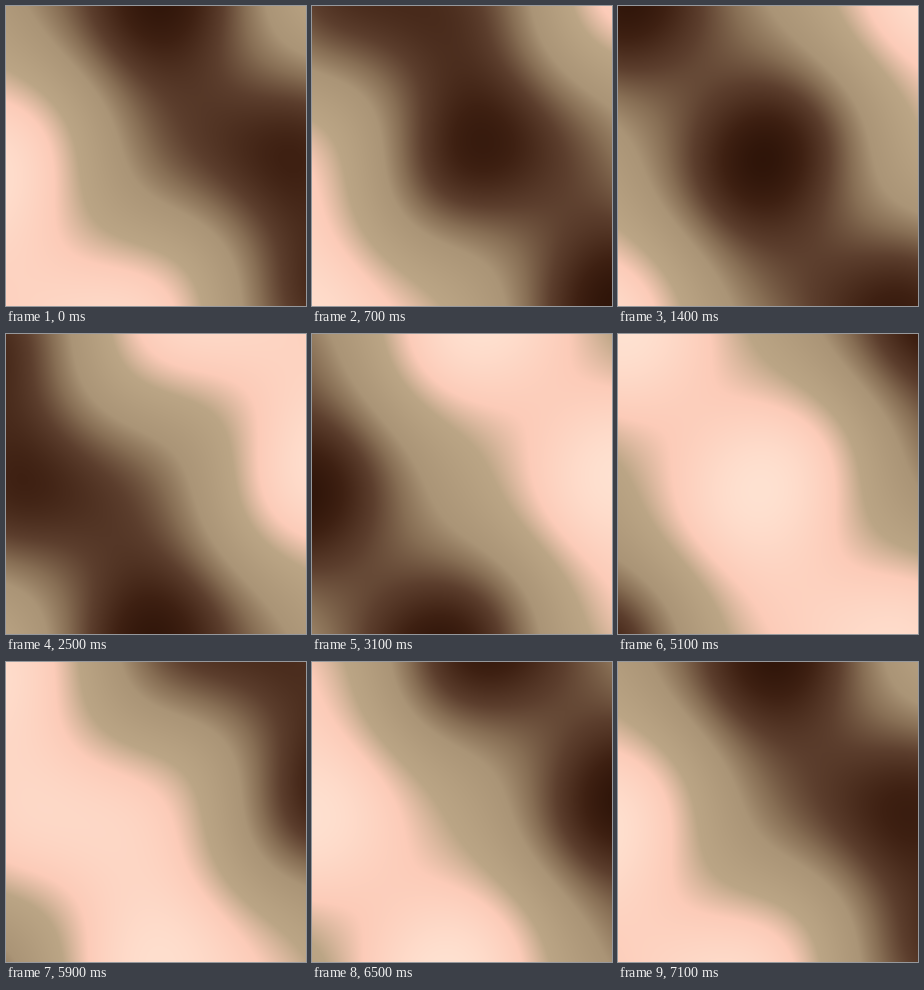
These frames come from a looping animation (300 by 300 pixels, 7200 ms). An HTML page with a canvas:

```html
<!DOCTYPE html>
<html lang="en">
<head>
<meta charset="utf-8">
<title>Drifting plasma</title>
<style>
html, body { margin: 0; width: 100%; height: 100%; overflow: hidden; background: #240c02; }
canvas { display: block; width: 300px; height: 300px; }
</style>
</head>
<body>
<canvas id="stage" width="300" height="300"></canvas>
<script>
const SIZE = 300, LOOP = 7200, STEP = 100;
const RAD = Math.PI / 180;

// Level from 0 to 1, then its colour.
const STOPS = [
  [0, 36, 12, 2], [.1, 62, 32, 18], [.2, 92, 62, 45], [.3, 135, 110, 84],
  [.4, 170, 148, 118], [.62, 187, 165, 133], [.75, 252, 203, 184], [1, 255, 230, 214]
];

function buildPalette() {
  const out = new Uint32Array(1024);
  let k = 0;
  for (let i = 0; i < out.length; i++) {
    const v = i / (out.length - 1);
    while (k < STOPS.length - 2 && v > STOPS[k + 1][0]) k++;
    const lo = STOPS[k], hi = STOPS[k + 1], f = (v - lo[0]) / (hi[0] - lo[0]);
    const [r, g, b] = [1, 2, 3].map(n => Math.round(lo[n] + (hi[n] - lo[n]) * f));
    out[i] = (255 << 24 | b << 16 | g << 8 | r) >>> 0;
  }
  return out;
}

// A strong diagonal wave, plus a weak one running the other way with humps across it.
const SWING = .46, STRONG = .8, WEAK = .2;
const WAVE = 75 * RAD, SKEW = 11 * RAD, PHASE = 243 * RAD;

const cosPart = new Float32Array(SIZE * SIZE);
const sinPart = new Float32Array(SIZE * SIZE);
const centred = n => (n + .5) / (SIZE / 2) - 1;

for (let y = 0; y < SIZE; y++) {
  for (let x = 0; x < SIZE; x++) {
    const along = centred(x) - centred(y), across = centred(x) + centred(y);
    const base = PHASE - SKEW * across, turn = WAVE * along;
    const hump = WEAK * Math.cos(Math.PI * across);
    const i = y * SIZE + x;
    cosPart[i] = SWING * (STRONG * Math.cos(base - turn) + hump * Math.cos(base + turn));
    sinPart[i] = SWING * (STRONG * Math.sin(base - turn) + hump * Math.sin(base + turn));
  }
}

const palette = buildPalette();
const ctx = document.getElementById("stage").getContext("2d");
const image = ctx.createImageData(SIZE, SIZE);
const pixels = new Uint32Array(image.data.buffer);

function draw(time) {
  const turn = time / LOOP * 2 * Math.PI, c = Math.cos(turn), s = Math.sin(turn);
  const top = palette.length - 1;
  for (let i = 0; i < pixels.length; i++) {
    const v = .5 + cosPart[i] * c + sinPart[i] * s;
    pixels[i] = palette[Math.max(0, Math.min(top, Math.round(v * top)))];
  }
  ctx.putImageData(image, 0, 0);
}

const start = performance.now();
let shown = -1;
function tick() {
  const elapsed = Math.max(0, performance.now() - start) % LOOP;
  const time = Math.floor(elapsed / STEP) * STEP;
  if (time !== shown) draw(shown = time);
  requestAnimationFrame(tick);
}
tick();
</script>
</body>
</html>
```
